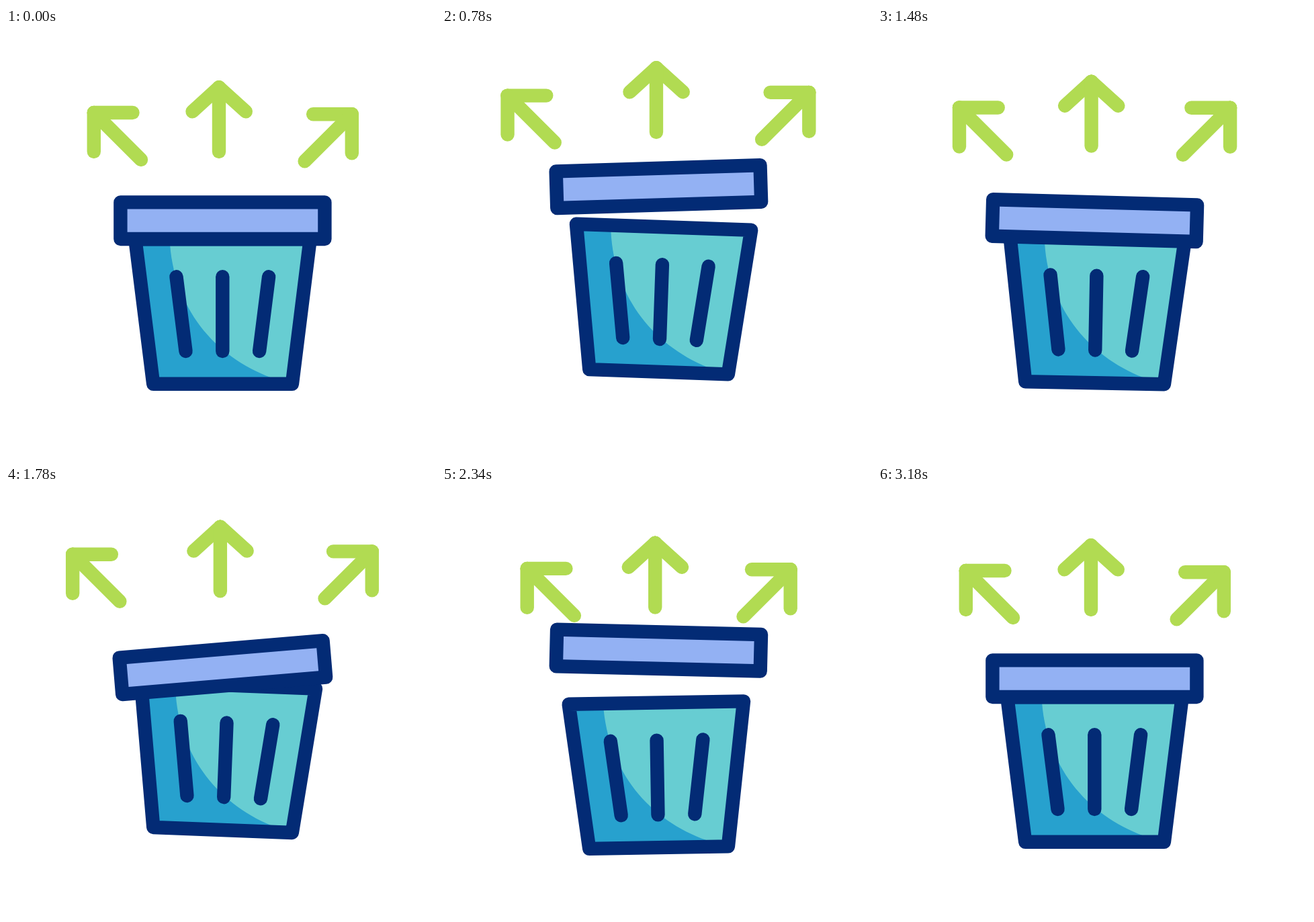
An HTML page with a canvas for the animation above (3600 ms loop, 640 by 640 pixels).

```html
<!DOCTYPE html>
<html lang="en">
<head>
<meta charset="utf-8">
<title>Bin</title>
<style>
html, body { margin: 0; width: 100%; height: 100%; overflow: hidden; background: #fff; }
canvas { display: block; width: 640px; height: 640px; }
</style>
</head>
<body>
<canvas id="stage" width="640" height="640"></canvas>
<script>
const ctx = document.getElementById('stage').getContext('2d');
const LOOP = 3600, STEP = 20, START = 200, LINE = 20.4;
const NAVY = '#032b75', LILAC = '#93b1f3', TEAL = '#67cdd2', BLUE = '#27a1ce', GREEN = '#b1db52';

const ease = u => u * u * (3 - 2 * u);

// Swings from 0 to each [ms, value] turning point in order, easing in and out.
function swing(...turns) {
  return t => {
    let from = START, value = 0;
    for (const [to, next] of turns) {
      if (t < to) return value + (next - value) * ease(Math.max(0, (t - from) / (to - from)));
      from = to;
      value = next;
    }
    return value;
  };
}

const spread = swing([733, 1], [1260, 0], [1880, 1], [2467, 0]);
const lidY = swing([820, -51.2], [1500, 0], [2200, -47], [2900, 0]);
const lidTurn = swing([550, -5.5], [1150, 6], [1970, -6.5], [2540, 4.5], [3200, 0]);
const binY = swing([820, -18.3], [1290, 10], [1725, -18.4], [2370, 8.5], [2720, 0]);
const binTurn = swing([720, 2.1], [1250, -0.5], [1700, 2.6], [2130, -1.5], [2660, 0]);

// Line ends and travel are offsets from the tip.
const arrows = [
  { tip: [130.8, 126], ends: [[57.7, 0], [0, 58], [70.2, 70]], travel: [-34, -26] },
  { tip: [317, 88.3], ends: [[-39.5, 36], [39.8, 36], [0, 95.7]], travel: [2, -29.7] },
  { tip: [514.8, 128.3], ends: [[-57.7, 0], [0, 58], [-70.2, 70]], travel: [32.2, -33.2] }
];

const body = new Path2D('M192.3 314.2H452.7L425.9 529.8H219.2Z');
const shade = new Path2D('M243.5 314C248.5 416 310 489 395 520.5V540H180V314Z');

function line(x1, y1, x2, y2) {
  ctx.beginPath();
  ctx.moveTo(x1, y1);
  ctx.lineTo(x2, y2);
  ctx.stroke();
}

// Draws a part lifted by dy and turned about the point (x, y).
function pose(x, y, dy, degrees, draw) {
  ctx.save();
  ctx.translate(x, y + dy);
  ctx.rotate(degrees * Math.PI / 180);
  ctx.translate(-x, -y);
  draw();
  ctx.restore();
}

function drawBin() {
  ctx.fillStyle = TEAL;
  ctx.fill(body);
  ctx.save();
  ctx.clip(body);
  ctx.fillStyle = BLUE;
  ctx.fill(shade);
  ctx.restore();
  ctx.strokeStyle = NAVY;
  ctx.stroke(body);
  for (const side of [-1, 0, 1]) line(322.3 + 68.8 * side, 370.3, 322.3 + 54.8 * side, 481);
}

function drawLid() {
  ctx.beginPath();
  ctx.rect(170.4, 259.4, 304, 54.6);
  ctx.fillStyle = LILAC;
  ctx.fill();
  ctx.strokeStyle = NAVY;
  ctx.stroke();
}

function drawArrows(s) {
  ctx.strokeStyle = GREEN;
  for (const { tip, ends, travel } of arrows) {
    const x = tip[0] + travel[0] * s, y = tip[1] + travel[1] * s;
    for (const [dx, dy] of ends) line(x, y, x + dx, y + dy);
  }
}

function render(now) {
  const t = Math.floor(now % LOOP / STEP) * STEP;
  ctx.fillStyle = '#fff';
  ctx.fillRect(0, 0, 640, 640);
  ctx.lineWidth = LINE;
  ctx.lineCap = ctx.lineJoin = 'round';
  drawArrows(spread(t));
  pose(322.5, 529.8, binY(t), binTurn(t), drawBin);
  pose(322.4, 286.7, lidY(t), lidTurn(t), drawLid);
}

const start = performance.now();
function tick() {
  render(performance.now() - start);
  requestAnimationFrame(tick);
}
tick();
</script>
</body>
</html>
```
